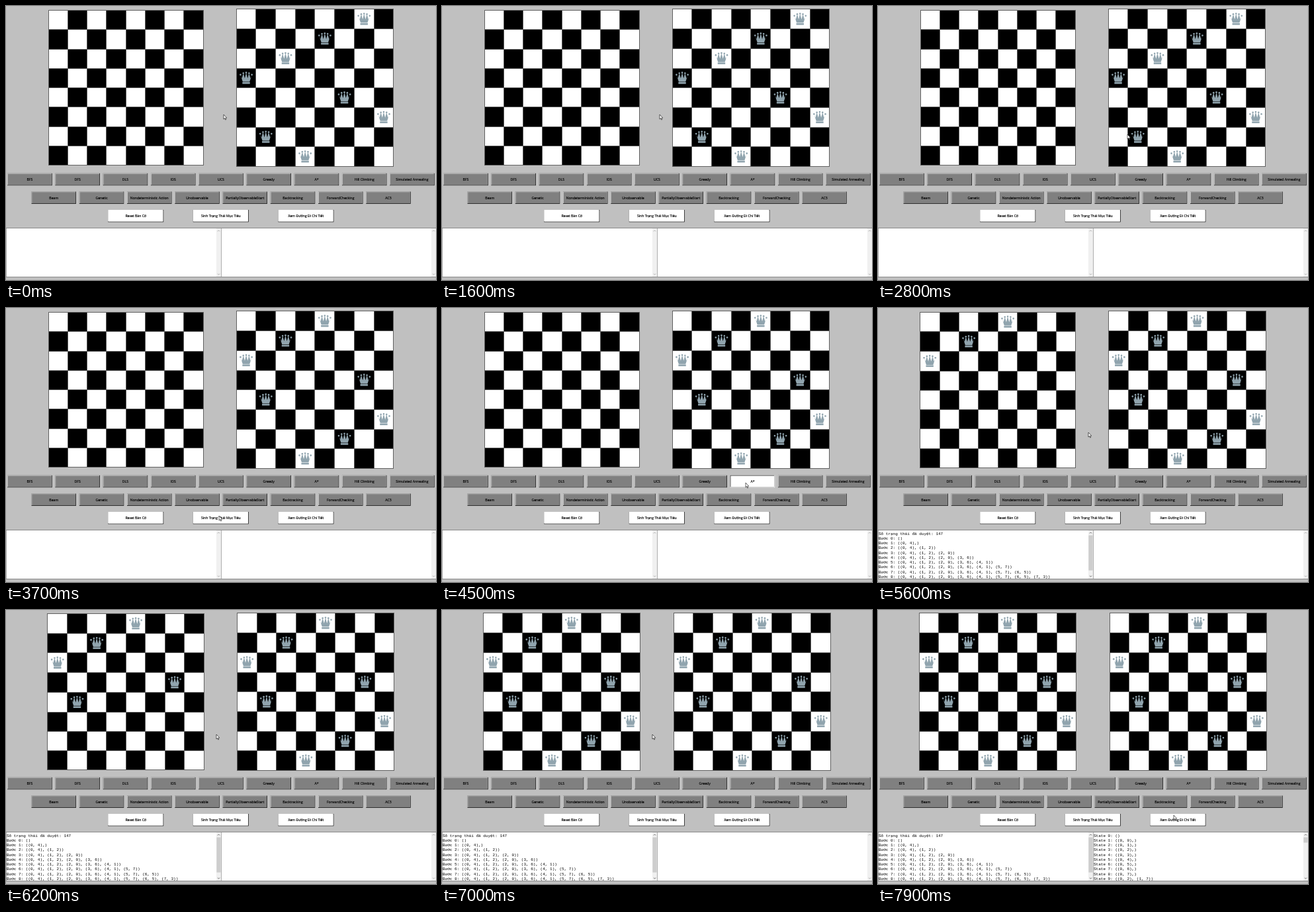
These frames come from a looping animation (650x414 px, 8 s). An HTML page with a canvas:

```html
<!DOCTYPE html>
<html lang="vi">
<head>
<meta charset="utf-8">
<title>Eight queens</title>
<style>
html, body { margin: 0; height: 100%; overflow: hidden; background: #c0c0c0; }
canvas { display: block; }
</style>
</head>
<body>
<canvas id="stage" width="650" height="414"></canvas>
<script>
const ctx = document.getElementById('stage').getContext('2d');
const LOOP = 8000, TICK = 100, SIZE = 8;
const EMPTY_CELL = 29.25, QUEEN_CELL = 29.7;

const T = { pressGoal: 3500, newGoal: 3600, pressSearch: 4500, result: 4600,
            firstQueen: 4900, queenStep: 300, pressDetail: 7700, detail: 7800 };

const REST = { x: 329, y: 164 };
const MOVES = [
  { from: 1600, to: 2000, x: 333, y: 252 },
  { from: 2000, to: 2400, x: 321, y: 98 },
  { from: 2400, to: 2800, x: 377, y: 194 },
  { from: 2800, to: 3400, x: 322, y: 314 },
  { from: 3700, to: 4200, x: 459, y: 264 },
  { from: 4700, to: 5300, x: 318, y: 188 },
  { from: 7000, to: 7700, x: 447, y: 310 }
];

const ROW_1 = ['BFS', 'DFS', 'DLS', 'IDS', 'UCS', 'Greedy', 'A*', 'Hill Climbing', 'Simulated Annealing'];
const ROW_2 = ['Beam', 'Genetic', 'Nondeterministic Action', 'Unobservable', 'PartiallyObservableStart',
               'Backtracking', 'ForwardChecking', 'AC3'];
const ROW_3 = ['Reset Bàn Cờ', 'Sinh Trạng Thái Mục Tiêu', 'Xem Đường Đi Chi Tiết'];

// Backtracking: the first way to complete the given rows; item i is the queen's column in row i.
function solve(columns) {
  const row = columns.length;
  if (row === SIZE) return columns;
  for (let col = 0; col < SIZE; col++) {
    const safe = columns.every((c, r) => c !== col && Math.abs(c - col) !== row - r);
    const found = safe && solve([...columns, col]);
    if (found) return found;
  }
  return null;
}
const FIRST_GOAL = solve([6, 4, 2]);
const SOLUTION = solve([4, 2, 0, 6]);

const range = n => Array.from({ length: n }, (_, i) => i);
const tuple = pairs => '(' + pairs.map(p => `(${p[0]}, ${p[1]})`).join(', ') + (pairs.length === 1 ? ',)' : ')');
const placed = SOLUTION.map((col, row) => [row, col]);
const STEPS = ['Số trạng thái đã duyệt: 147',
  ...range(SIZE + 1).map(n => `Bước ${n}: ${tuple(placed.slice(0, n))}`)];
const STATES = [[], ...range(SIZE).map(col => [[0, col]]), [[0, 2], [1, 7]]]
  .map((pairs, n) => `State ${n}: ${tuple(pairs)}`);

function rect(x, y, w, h, color) {
  ctx.fillStyle = color;
  ctx.fillRect(x, y, w, h);
}

function queen(x, y) {
  ctx.save();
  ctx.translate(x, y);
  ctx.fillStyle = '#90a4ae';
  const tips = range(5).map(i => i - 2).map(i => ({ x: i * 4.3, y: 0.8 * i * i - 8.2 }));
  ctx.beginPath();
  ctx.moveTo(-5.2, 5.6);
  tips.forEach((tip, i) => {
    if (i) ctx.lineTo(tip.x - 2.1, 0.5);
    ctx.lineTo(tip.x, tip.y);
  });
  ctx.lineTo(5.2, 5.6);
  ctx.fill();
  for (const tip of tips) {
    ctx.beginPath();
    ctx.arc(tip.x, tip.y, 1.3, 0, 7);
    ctx.fill();
  }
  ctx.fillRect(-5.7, 6.2, 11.4, 2.6);
  ctx.restore();
}

// Grid lines along one axis: tracks that hold a queen are slightly larger.
function edges(start, used) {
  const list = [start];
  for (const i of range(SIZE)) list.push(list[i] + (used.includes(i) ? QUEEN_CELL : EMPTY_CELL));
  return list;
}

const boardSize = count => SIZE * EMPTY_CELL + count * (QUEEN_CELL - EMPTY_CELL);

function board(x, columns) {
  const xs = edges(x, columns);
  const ys = edges(123.7 - boardSize(columns.length) / 2, columns.map((_, row) => row));
  const px = xs.map(Math.floor), py = ys.map(Math.floor);
  const w = px[SIZE] - px[0], h = py[SIZE] - py[0];
  for (const r of range(SIZE)) {
    for (const c of range(SIZE)) {
      rect(px[c], py[r], px[c + 1] - px[c], py[r + 1] - py[r], (r + c) % 2 ? '#000' : '#fff');
    }
  }
  for (const i of range(SIZE + 1)) {
    rect(px[i], py[0], 1, h + 1, '#606060');
    rect(px[0], py[i], w + 1, 1, '#606060');
  }
  columns.forEach((c, r) => queen((xs[c] + xs[c + 1]) / 2, (ys[r] + ys[r + 1]) / 2));
}

function button(x, y, w, label, face, pressed) {
  const h = 18.4;
  const light = face === '#fff' ? '#fff' : '#dcdcdc', dark = '#202020';
  rect(x, y, w, h, pressed ? light : dark);
  rect(x, y, w - 0.9, h - 0.9, pressed ? dark : light);
  rect(x + 0.7, y + 0.7, w - 1.6, h - 1.6, face);
  ctx.fillStyle = ctx.strokeStyle = '#000';
  ctx.lineWidth = 0.15;
  ctx.font = '5.15px "Open Sans", "Noto Sans", sans-serif';
  ctx.textAlign = 'center';
  ctx.fillText(label, x + w / 2, y + 11);
  ctx.strokeText(label, x + w / 2, y + 11);
}

function arrow(x, y, dir, color) {
  ctx.strokeStyle = color;
  ctx.lineWidth = 0.8;
  ctx.beginPath();
  ctx.moveTo(x - 1.6, y + dir);
  ctx.lineTo(x, y - dir * 0.6);
  ctx.lineTo(x + 1.6, y + dir);
  ctx.stroke();
}

function textBox(x, lines, thumb) {
  const arrowColor = lines ? '#505050' : '#a0a0a0';
  rect(x, 335, 325, 75, '#8a8a8a');
  rect(x + 0.7, 336, 317.3, 73, '#fff');
  rect(x + 318, 336, 7, 73, '#f0f0f0');
  arrow(x + 321.5, 339.5, 1, arrowColor);
  arrow(x + 321.5, 405.5, -1, arrowColor);
  if (!lines) return;
  rect(x + 318.3, 343.5, 6.2, thumb, '#cdcdcd');
  ctx.fillStyle = '#000';
  ctx.font = '6px "Liberation Mono", monospace';
  ctx.textAlign = 'left';
  lines.forEach((line, i) => ctx.fillText(line, x + 1, 342.5 + i * 7.27));
}

function pointerAt(t) {
  let { x, y } = REST;
  for (const move of MOVES) {
    const p = Math.min(1, Math.max(0, (t - move.from) / (move.to - move.from)));
    const k = p * p * (3 - 2 * p);
    x += (move.x - x) * k;
    y += (move.y - y) * k;
  }
  return { x, y };
}

const POINTER = new Path2D('M0 0V7L1.6 5.6 2.7 8 3.7 7.6 2.7 5.2 4.7 5.1Z');

function pointer(t) {
  const { x, y } = pointerAt(t);
  ctx.save();
  ctx.translate(x, y);
  ctx.fillStyle = '#fff';
  ctx.fill(POINTER);
  ctx.strokeStyle = '#000';
  ctx.lineWidth = 0.6;
  ctx.stroke(POINTER);
  ctx.restore();
}

function draw(t) {
  const pressedAt = start => t >= start && t < start + TICK;
  const count = Math.max(0, Math.min(SIZE, Math.floor((t - T.firstQueen) / T.queenStep) + 1));
  const growth = (boardSize(count) - boardSize(0)) / 2;

  rect(0, 0, 650, 414, '#c0c0c0');
  board(64 - growth, SOLUTION.slice(0, count));
  board(348.2 + growth, t < T.newGoal ? FIRST_GOAL : SOLUTION);

  ROW_1.forEach((label, i) => {
    const pressed = label === 'A*' && pressedAt(T.pressSearch);
    button(2.2 + i * 72.25, 252.8, 67.5, label, pressed ? '#fff' : '#808080', pressed);
  });
  ROW_2.forEach((label, i) => button(38.5 + i * 72.25, 280.5, 67.5, label, '#808080'));
  ROW_3.forEach((label, i) => button(154.2 + i * 128.6, 308, 84, label, '#fff',
    i === 1 && pressedAt(T.pressGoal) || i === 2 && pressedAt(T.pressDetail)));

  textBox(0, t >= T.result && STEPS, 53);
  textBox(325, t >= T.detail && STATES, 8);
  pointer(t);
}

function frame() {
  draw(Math.floor(performance.now() % LOOP / TICK) * TICK);
  requestAnimationFrame(frame);
}
frame();
</script>
</body>
</html>
```
